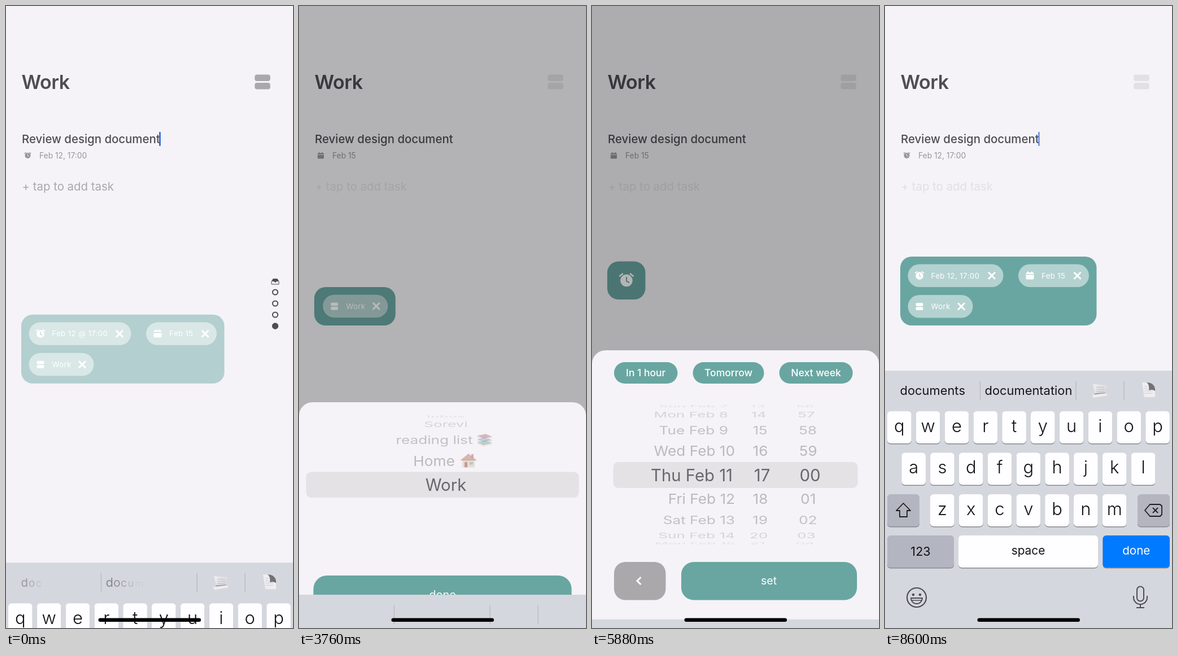
An HTML page with a canvas for the animation above (8.64 s loop, 508 px wide and 1102 px high).

```html
<!DOCTYPE html>
<html lang="en">
<head>
<meta charset="utf-8">
<title>Task reminder</title>
<style>
html, body { margin: 0; width: 100%; height: 100%; overflow: hidden; background: #f5f3f7; }
canvas { display: block; width: 100vw; height: 100vh; }
</style>
</head>
<body>
<canvas id="c"></canvas>
<script>
const W = 508, H = 1102, LOOP = 8640, STEP = 40;
const BG = '#f5f3f7', TEAL = '#69a6a1', INK = '#4f4d52', GREY = '#aaa8ab';
const canvas = document.getElementById('c');
const c = canvas.getContext('2d');
const dpr = window.devicePixelRatio || 1;
canvas.width = W * dpr;
canvas.height = H * dpr;

const clamp = v => Math.max(0, Math.min(1, v));
const mix = (a, b, p) => a + (b - a) * p;
const easeOut = u => 1 - Math.pow(1 - clamp(u), 3);
// critically damped spring, 0 -> 1
const spring = (ms, w) => {
  const x = Math.max(0, ms) * w / 1000;
  return 1 - (1 + x) * Math.exp(-x);
};

function box(x, y, w, h, r, fill) {
  c.beginPath();
  c.roundRect(x, y, w, h, r);
  c.fillStyle = fill;
  c.fill();
}
function disc(x, y, r, fill) {
  c.beginPath();
  c.arc(x, y, r, 0, 7);
  c.fillStyle = fill;
  c.fill();
}
function line(pts, color, width, close) {
  c.beginPath();
  pts.forEach(([x, y]) => c.lineTo(x, y));
  if (close) c.closePath();
  c.strokeStyle = color;
  c.lineWidth = width;
  c.stroke();
}
function poly(pts, fill) {
  c.beginPath();
  pts.forEach(([x, y]) => c.lineTo(x, y));
  c.fillStyle = fill;
  c.fill();
}
function text(s, x, y, size, color, weight = 400, align = 'left', gap = 0) {
  c.font = `${weight} ${size}px Inter, Roboto, sans-serif`;
  c.letterSpacing = gap + 'px';
  c.textAlign = align;
  c.fillStyle = color;
  c.fillText(s, x, y);
}
function faded(a, draw) {
  if (a <= 0) return;
  c.save();
  c.globalAlpha *= Math.min(1, a);
  draw();
  c.restore();
}
function at(x, y, k, draw) {
  c.save();
  c.translate(x, y);
  c.scale(k, k);
  draw();
  c.restore();
}

// icons
function alarm(x, y, r, color, hands) {
  at(x, y, r / 10, () => {
    disc(0, 0.8, 10, color);
    c.lineCap = 'round';
    line([[-11, -6.5], [-6.4, -10.2]], color, 2.4);
    line([[11, -6.5], [6.4, -10.2]], color, 2.4);
    line([[0, -4.5], [0, 1.5], [4, 4]], hands, 1.8);
    c.lineCap = 'butt';
  });
}
function calendar(x, y, k, color, gap) {
  at(x, y, k, () => {
    box(-7, -5.5, 14, 12.5, 2, color);
    box(-4.5, -7.5, 2, 4, 1, color);
    box(2.5, -7.5, 2, 4, 1, color);
    c.fillStyle = gap;
    c.fillRect(-7, -2.6, 14, 1.2);
  });
}
function bars(x, y, w, h, r, color) {
  box(x - w / 2, y - h, w, h * 0.88, r, color);
  box(x - w / 2, y + h * 0.12, w, h * 0.88, r, color);
}

// timeline: panel layout, keyboard and sheets
const LAYOUT = [
  { t: -900, right: 386.5, top: 444, bottom: 566, due: 'Feb 12 @ 17:00', feb: 248, work: 40.5, row: 1 },
  { t: 1480, right: 389, top: 498, bottom: 566, icon: 1, feb: 108.5, work: 260.5, row: 0 },
  { t: 3600, right: 169, top: 498, bottom: 566, work: 40.5, row: 0 },
  { t: 4856, right: 389, top: 498, bottom: 566, icon: 1, feb: 108.5, work: 260.5, row: 0 },
  { t: 5640, right: 94.5, top: 452.5, bottom: 520, icon: 1 },
  { t: 7080, right: 374.5, top: 444, bottom: 566, due: 'Feb 12, 17:00', feb: 236, work: 40.5, row: 1 }
];
const KEYBOARD = [[-45, 1], [3595, 0], [4860, 1], [5638, 0], [7080, 1]];
const last = (list, t, key) => {
  let i = 0;
  while (i + 1 < list.length && t >= list[i + 1][key]) i++;
  return i;
};
const sheetUp = (t, open, close) =>
  t < open ? 0 : t < close ? spring(t - open, 25) : 1 - spring(t - close, 21.6);

function cursorAlpha(t) {
  if ((t >= 3600 && t < 4860) || (t >= 5640 && t < 7080)) return 0;
  if (t >= 1000 && t < 2000) return 1;
  const out = t < 1000 ? 500 : t < 4000 ? 2220 : t < 6000 ? 5360 : 7540;
  if (t < out) return 1;
  const p = (t - out) % 1000;
  return p < 180 ? 1 - p / 180 : p < 370 ? 0 : clamp((p - 370) / 130);
}

function chip(x, y, w, label, icon, a) {
  faded(a, () => {
    box(x, y, w, 40.5, 20.25, 'rgba(255,255,255,.5)');
    icon(x + 20.5, y + 20);
    text(label, x + 41, y + 25, 13.2, '#fff', 400, 'left', 0.4);
    const cx = x + w - 20.5, cy = y + 20.3, d = 6;
    line([[cx - d, cy - d], [cx + d, cy + d]], '#fff', 3);
    line([[cx - d, cy + d], [cx + d, cy - d]], '#fff', 3);
  });
}

function panel(t) {
  const i = last(LAYOUT, t, 't'), s = LAYOUT[i], prev = LAYOUT[Math.max(0, i - 1)];
  const age = t - s.t, p = easeOut(age / 200);
  const go = k => prev[k] === undefined ? s[k] : mix(prev[k], s[k], p);
  const show = k => prev[k] === undefined ? clamp(age / 140) : 1;
  const enter = spring(t + 72, 22);
  const top = go('top'), bottom = go('bottom'), right = go('right');
  c.save();
  c.translate(0, 194 * (1 - enter));
  faded(enter, () => box(27, top, right - 27, bottom - top, 20, TEAL));
  const y = top + 13.5;
  if (s.icon) faded(show('icon'), () => alarm(61, top + 33, 10.8, '#fff', TEAL));
  if (s.due) chip(40.5, y, s.due.includes('@') ? 181 : 169, s.due,
    (x, cy) => alarm(x, cy, 6.8, '#fff', '#b4d2d0'), show('due'));
  if (s.feb) chip(go('feb'), y, 125, 'Feb 15',
    (x, cy) => calendar(x, cy, 1, '#fff', '#b4d2d0'), show('feb'));
  if (s.work) chip(go('work'), mix(y, bottom - 54, go('row')), 115, 'Work',
    (x, cy) => bars(x, cy + 0.5, 13, 6.5, 2, '#fff'), show('work'));
  c.restore();
}

function page(t) {
  const rest = mix(1, 0.25, clamp(t / 280));
  c.fillStyle = BG;
  c.fillRect(0, 0, W, H);
  text('Work', 27.5, 147, 34, INK, 600, 'left', -0.5);
  faded(rest, () => {
    bars(454, 134.5, 27.5, 13, 4, GREY);
    text('+ tap to add task', 28.5, 327, 20.4, GREY);
  });
  text('Review design document', 28, 243, 20.4, INK, 500);
  if (t >= 1480 && t < 7080) {
    calendar(38.5, 265, 0.8, '#98969a', BG);
    text('Feb 15', 59, 270, 13.8, '#98969a');
  } else {
    alarm(38.5, 264.5, 5, '#98969a', BG);
    text('Feb 12, 17:00', 59, 270, 13.8, '#98969a');
  }
  faded(cursorAlpha(t), () => box(271, 223, 2.8, 25, 1, '#3468d8'));
  faded(1 - clamp(t / 280), () => {
    line([[470, 488], [473, 483.5], [480, 483.5], [483, 488], [483, 493], [470, 493]], INK, 1, true);
    poly([[470, 487.5], [473, 483], [480, 483], [483, 487.5], [479, 488], [477, 490], [474, 488]], INK);
    for (let i = 0; i < 3; i++) {
      c.beginPath();
      c.arc(476.5, 507 + i * 20, 4.6, 0, 7);
      c.strokeStyle = INK;
      c.lineWidth = 2;
      c.stroke();
    }
    disc(476.5, 567, 5.7, INK);
  });
  panel(t);
}

// wheel item n rows away from the middle row
function wheel(label, n, x, y, align, extra) {
  const a = n * 0.352;
  c.save();
  c.translate(x, y + 123 * Math.sin(a));
  c.scale(1, Math.cos(a));
  const alpha = n ? [0.78, 0.68, 0.42, 0.25][Math.abs(n) - 1] : 1;
  faded(alpha, () => {
    const size = n ? 26.2 : 29.3;
    text(label, 0, size * 0.36, size, n ? GREY : '#69676b', 400, align);
    if (extra) extra();
  });
  c.restore();
}

function house() {
  c.globalAlpha *= 0.7;
  box(-11, -3, 22, 15, 1, '#dccbb9');
  poly([[-15, -1], [0, -14], [15, -1]], '#c38078');
  box(5, -13, 4, 7, 0, '#b08078');
  box(-7, 2, 5, 10, 0, '#a5655c');
  box(2, 2, 6, 5, 0, '#8fb0c4');
}
function books() {
  c.globalAlpha *= 0.75;
  [['#7da78f', 8], ['#86a9c4', 1], ['#b97d7d', -7]].forEach(([col, y]) => {
    poly([[-13, y - 3], [2, y - 7], [13, y - 1], [-2, y + 4]], col);
    poly([[-13, y - 2], [-2, y + 4], [13, y - 1], [13, y + 2], [-2, y + 7], [-13, y + 1]], '#d7d3cf');
  });
}

function sheet(up, height, draw) {
  if (up < 0.002) return;
  const top = H - height * up;
  box(0, top, W, H - top + 30, [24, 24, 0, 0], BG);
  c.save();
  c.translate(0, top);
  draw();
  c.restore();
}

function listSheet() {
  box(12.5, 123.5, 483, 45.5, 9, '#e4e2e5');
  wheel('Work', 0, 260, 146.5, 'center');
  wheel('Home', -1, 239, 146.5, 'center', () => at(61, 0, 1, house));
  wheel('reading list', -2, 239.5, 146.5, 'center', () => at(89, 0, 1, books));
  wheel('Sorevi', -3, 260, 146.5, 'center');
  wheel('Inbox', -4, 260, 146.5, 'center');
  box(25.5, 307, 457, 68, 24, TEAL);
  text('done', 254, 348, 20, '#fff', 400, 'center');
}

function timeSheet() {
  [['In 1 hour', 39, 112.5], ['Tomorrow', 178.5, 126], ['Next week', 331.5, 130]].forEach(([s, x, w]) => {
    box(x, 21, w, 38, 19, TEAL);
    text(s, x + w / 2, 46, 17.5, '#fff', 500, 'center');
  });
  box(37.5, 198, 433, 46, 9, '#e4e2e5');
  const days = ['Sun', 'Mon', 'Tue', 'Wed', 'Thu', 'Fri', 'Sat'];
  for (let n = -4; n <= 4; n++) {
    const day = 11 + n, k = Math.abs(n), two = v => String(v).padStart(2, '0');
    wheel(`${days[(n + 11) % 7]} Feb ${day}`, n, day < 10 ? 241 : n ? 253 : 249, 221, 'right');
    const pull = [0, 3, 3.5, 6, 8][k];
    wheel(two(17 + n), n, 301 - pull, 221, 'center');
    wheel(two((60 + n) % 60), n, 386 - pull * 1.1, 221, 'center');
  }
  box(39, 375, 91.5, 67.5, 20, GREY);
  line([[86.5, 402], [80, 408.5], [86.5, 415]], '#fff', 3);
  box(158, 375, 311, 67.5, 22, TEAL);
  text('set', 313, 415.5, 19.5, '#fff', 400, 'center');
}

// letters grow in one after another
function suggestion(word, x, y, age, up) {
  const size = 21.9, whole = up ? clamp(age / 110) : 1;
  [...word].forEach((ch, i) => {
    const a = up ? clamp((age / 131 * word.length - i) / 4) : 1 - clamp(age / 150);
    c.font = `400 ${size}px Inter, Roboto, sans-serif`;
    c.letterSpacing = '0px';
    c.textAlign = 'left';
    const dx = c.measureText(word.slice(0, i)).width;
    faded(a * whole, () => text(ch, x + dx, y, size * mix(0.7, 1, a), '#161619'));
  });
}

function pages() {
  const g = c.createLinearGradient(370, 26, 390, 46);
  g.addColorStop(0, '#efedef');
  g.addColorStop(1, '#d2d0d2');
  poly([[368, 24], [393, 26], [390, 40], [372, 41]], g);
  poly([[372, 40], [390, 39], [391, 43], [369, 45]], '#a09ea1');
  poly([[367, 43], [392, 40], [393, 44], [369, 48]], '#efedef');
  for (let i = 0; i < 3; i++) line([[374, 29 + i * 4], [388, 29.5 + i * 4]], '#c0bec1', 1);

  poly([[455, 21], [466, 21], [478, 34], [478, 47], [459, 47]], '#efedef');
  c.beginPath();
  c.moveTo(463, 21);
  c.bezierCurveTo(473, 21, 479, 27, 478, 36);
  c.bezierCurveTo(473, 33, 470, 34, 467, 35);
  c.bezierCurveTo(468, 29, 467, 24, 463, 21);
  c.fillStyle = '#737175';
  c.fill();
  for (let i = 0; i < 4; i++) line([[459, 28 + i * 4], [465 + (i > 1) * 8, 28 + i * 4]], '#cfcdd0', 1);
}

function key(x, y, w, label, opt = {}) {
  box(x, y + 1.5, w, 57, 6, '#898a90');
  box(x, y, w, 57, 6, opt.fill || '#fefdff');
  if (label) text(label, x + w / 2, y + (opt.base || 36.5), opt.size || 31, opt.color || '#121214', opt.weight || 300, 'center');
}

function keyboard(t) {
  const i = last(KEYBOARD, t, 0), [start, up] = KEYBOARD[i];
  const age = t - start, p = spring(age, 21.6);
  const top = H - 456 * (up ? p : 1 - p);
  if (top > H - 0.5) return;
  c.save();
  c.translate(0, top);
  c.fillStyle = '#d5d7de';
  c.fillRect(0, 0, W, 470);
  suggestion('documents', 26.5, 43, age, up);
  suggestion('documentation', 176.5, 43, age, up);
  [168.5, 338, 423].forEach(x => line([[x, 18], [x, 52]], '#b7b8c0', 1.3));
  faded(up ? 1 : 1 - age / 150, pages);
  [['qwertyuiop', 4, 72], ['asdfghjkl', 29.3, 145.5], ['zxcvbnm', 80, 219]].forEach(([row, x, y]) =>
    [...row].forEach((ch, n) => key(x + n * 50.8, y, 42.7, ch)));
  const dark = '#b3b5c1', ink = '#1c1c1f';
  key(4, 219, 57, '', { fill: dark });
  key(447, 219, 57, '', { fill: dark });
  c.lineJoin = 'round';
  line([[32.5, 235], [45, 248], [39, 248], [39, 259], [26, 259], [26, 248], [20, 248]], ink, 1.8, true);
  line([[460, 247.5], [469, 237], [487, 237], [490, 240], [490, 255], [487, 258], [469, 258]], ink, 1.8, true);
  line([[474, 243], [483, 252]], ink, 1.8);
  line([[483, 243], [474, 252]], ink, 1.8);
  c.lineJoin = 'miter';
  key(4, 292, 118, '123', { fill: dark, base: 36, size: 21.6, weight: 400 });
  key(130, 292, 247, 'space', { base: 34, size: 20.8, weight: 400 });
  key(385.5, 292, 118.5, 'done', { fill: '#007aff', color: '#fff', base: 34, size: 20.6, weight: 400 });

  const soft = '#4d4e53';
  c.strokeStyle = soft;
  c.lineWidth = 2.2;
  c.beginPath();
  c.arc(56, 402, 17, 0, 7);
  c.stroke();
  disc(50, 397, 2.3, soft);
  disc(62, 397, 2.3, soft);
  c.beginPath();
  c.arc(56, 403, 10, 0, Math.PI);
  c.closePath();
  c.lineWidth = 1.8;
  c.stroke();
  line([[47, 407], [65, 407]], soft, 1.5);
  c.lineWidth = 2;
  c.beginPath();
  c.roundRect(446, 382.5, 12, 26, 6);
  c.stroke();
  c.beginPath();
  c.moveTo(440, 399);
  c.lineTo(440, 402);
  c.arc(452, 402, 12, Math.PI, 0, true);
  c.lineTo(464, 399);
  c.moveTo(452, 414);
  c.lineTo(452, 420);
  c.moveTo(445, 420);
  c.lineTo(459, 420);
  c.stroke();
  c.restore();
}

function draw(t) {
  c.setTransform(canvas.width / W, 0, 0, canvas.height / H, 0, 0);
  page(t);
  const list = sheetUp(t, 3600, 4860), time = sheetUp(t, 5640, 7080);
  c.fillStyle = `rgba(0,0,0,${0.3 * Math.max(list, time)})`;
  c.fillRect(0, 0, W, H);
  sheet(list, 440.3, listSheet);
  sheet(time, 500.7, timeSheet);
  keyboard(t);
  box(163.5, 1084.5, 181.5, 6.5, 3.25, '#000');
}

// the picture advances at 25 steps per second
const begin = performance.now();
function tick() {
  const t = performance.now() - begin + 3;
  draw(Math.floor(t / STEP) * STEP % LOOP);
  requestAnimationFrame(tick);
}
tick();
</script>
</body>
</html>
```
